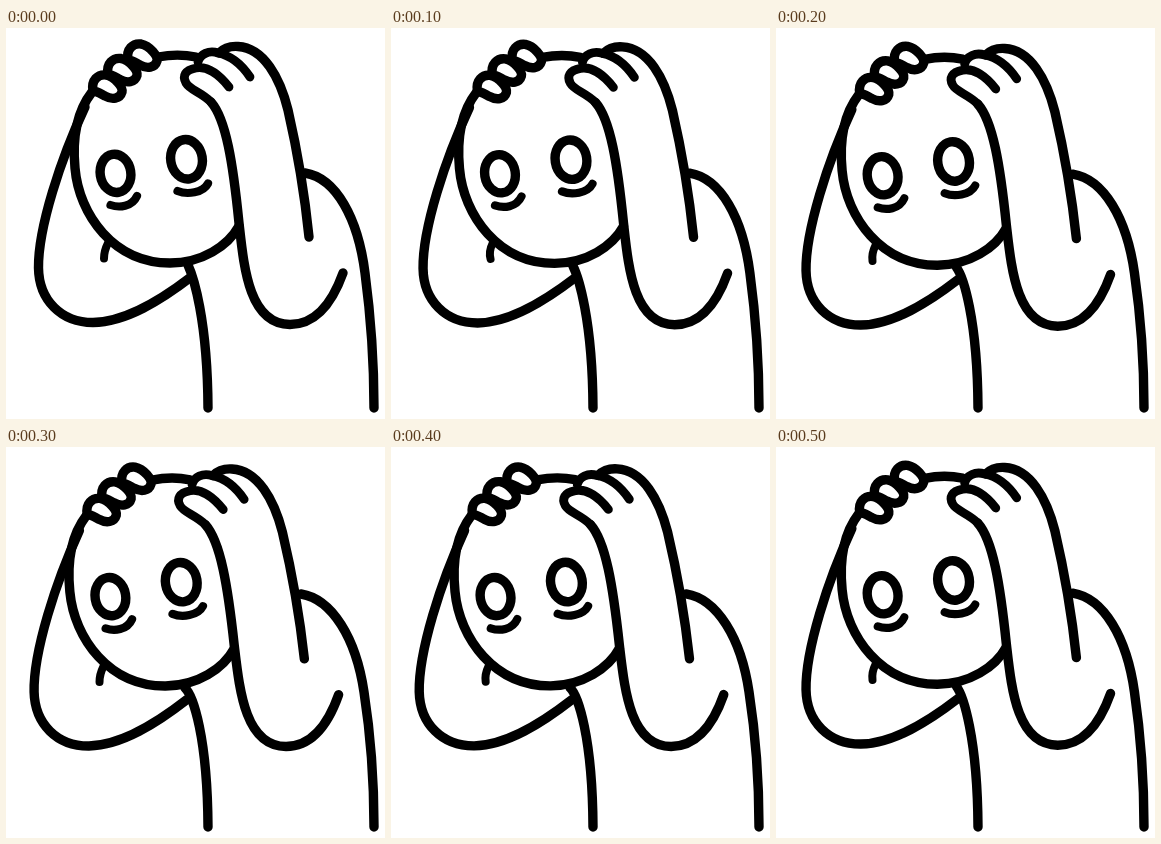
Animation of 379x391 px, one loop 600 ms. Source, as an HTML page:

```html
<!DOCTYPE html>
<html lang="en">
<head>
<meta charset="utf-8">
<title>Head in hands</title>
<style>
html, body { margin: 0; width: 100%; height: 100%; overflow: hidden; background: #fff; }
svg { display: block; width: 379px; height: 391px; }
</style>
</head>
<body>
<svg viewBox="0 0 379 391" fill="none" stroke="#000" stroke-width="9.400" stroke-linecap="round" stroke-linejoin="round">
  <defs>
    <path id="finger" d="M87 63C85 52 92 46 100 47C109 49 117 59 116 64C114 71 106 72 99 68C95 66 91 63 87 63"/>
  </defs>
  <path id="back"/>
  <path id="chest"/>
  <g id="upper">
    <!-- head -->
    <path d="M86 64C72 82 66 108 69 140C73 187 108 235 164 235C196 235 222 218 233 198M152 29C165 26.500 178 26.500 190 29"/>
    <!-- left arm -->
    <path d="M79 79C55 130 32 200 32.500 240C33 272 55 294.500 87 294.500C120 294 155 272 185 249"/>
    <path id="crease" stroke-width="8"/>
    <!-- left fingers -->
    <use href="#finger"/>
    <use href="#finger" x="15" y="-16.500"/>
    <use href="#finger" x="35" y="-31"/>
    <!-- right arm and hand -->
    <path d="M205 74C220 91 227 135 233 195C238 240 243 296 284 296.500C312 296.500 328 270 337 245"/>
    <path d="M223 59C212 45 200 38 190 40C179 42 176 48 180 55C184 62 195 64 205 74M244 49C234 34 222 27 212 25C203 22 194 26 192 34" stroke-width="8.800"/>
    <path d="M213 25C218 20 225 18 232 18.500C258 20 274 50 282 82C290 117 298 160 303 209"/>
    <!-- eyes -->
    <ellipse rx="15.300" ry="19.200" transform="translate(109.500 145.300) rotate(-9)"/>
    <ellipse rx="15.800" ry="19.800" transform="translate(180.500 131.300) rotate(-9)"/>
    <path d="M104.500 177C113 180 126 179 131 168M171.500 163C181 167 197 165 202 155.500" stroke-width="8.200"/>
  </g>
</svg>
<script>
const $ = id => document.getElementById(id);
const slump = [0, .1, .56, 1, .97, .56];
const wobble = [0, 2, 1, 0, 1, 1];

function pose(step) {
  const k = slump[step];
  // the upper body sinks and tilts; the torso lines only bend at the top
  $('upper').setAttribute('transform', `translate(${-6.2 * k} ${5.2 * k}) rotate(${-.43 * k})`);
  $('crease').setAttribute('d', `M102 215Q98 223 ${98 + wobble[step]} 230.500`);
  $('back').setAttribute('d',
    `M${299 - 4 * k} ${145 + 2 * k}C${330 - 4 * k} ${150 + 2 * k} ${352 - 2 * k} ${190 + k} ${359 - k} 245C365 290 368 330 368 380`);
  $('chest').setAttribute('d', `M${182 - 3 * k} ${237 + 4 * k}C187 248 201.500 290 202 380`);
}

function tick() {
  pose(Math.floor(performance.now() / 100) % 6);
  requestAnimationFrame(tick);
}
tick();
</script>
</body>
</html>
```
